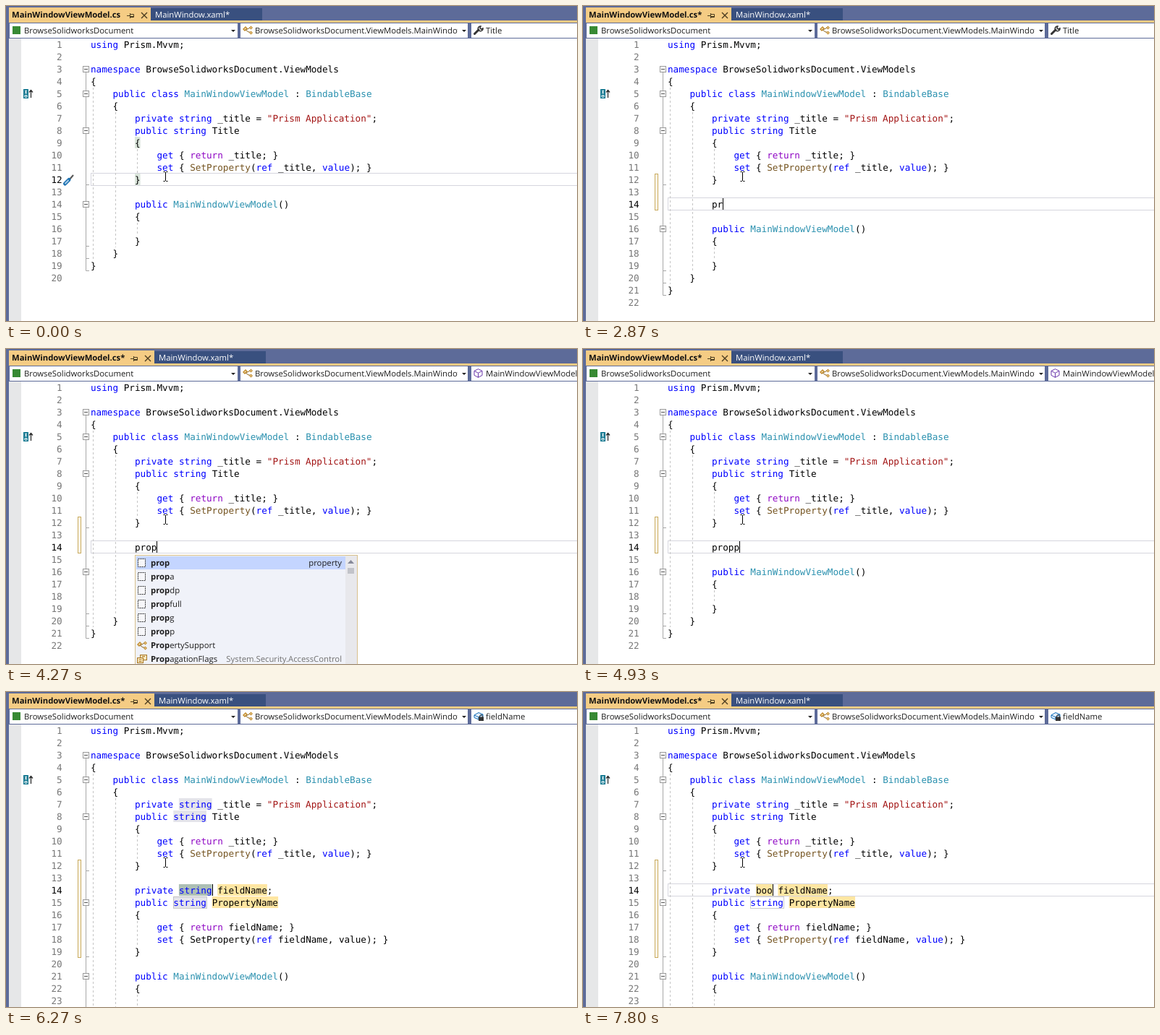
Recreate the animation shown at these times as an HTML page. Size 789 by 436 pixels, loop 8000 ms.

```html
<!DOCTYPE html>
<html lang="en">
<head>
<meta charset="utf-8">
<title>Code editor</title>
<style>
html, body { margin: 0; width: 100%; height: 100%; overflow: hidden; background: #fff; }
svg { display: block; width: 789px; height: 436px; }
svg svg { width: 280px; height: 19px; }
text { text-rendering: geometricPrecision; font: 11.3px "Open Sans", "Noto Sans", sans-serif; }
.code { font: 12.65px "DejaVu Sans Mono", "Noto Sans Mono", monospace; }
.bold { font-weight: bold; }
</style>
</head>
<body>
<svg id="stage" viewBox="0 0 789 436"></svg>
<script>
(() => {
const LOOP = 8000, LEFT = 117, CHAR = 7.62, PITCH = 17;
const YELLOW = '#ffe6a2', MATCH = '#e4e4ea', SELECTED = '#adbfb4', BRACE = '#dbe6dc', GOLD = '#c8a95c', FRAME = '#5d6b99';

const head = [
  'using Prism.Mvvm;', '',
  'namespace BrowseSolidworksDocument.ViewModels', '{',
  '    public class MainWindowViewModel : BindableBase', '    {',
  '        private string _title = "Prism Application";',
  '        public string Title', '        {',
  '            get { return _title; }',
  '            set { SetProperty(ref _title, value); }', '        }'
];
const tail = [
  '        public MainWindowViewModel()', '        {', '', '        }', '    }', '}', ''
];
const typed = word => ['', '        ' + word, ''];
const snippet = type => ['',
  `        private ${type} fieldName;`,
  '        public string PropertyName', '        {',
  '            get { return fieldName; }',
  '            set { SetProperty(ref fieldName, value); }', '        }', ''];

// Each step changes part of the state from its time on.
const steps = [
  [0, { mid: [''], line: 12, caret: 0, brace: 1, tip: 1, bar: 0, nav: 'Title', current: 1 }],
  [330, { caret: 9 }],
  [870, { caret: 0 }],
  [1400, { caret: 9 }],
  [1530, { mid: ['', ''], line: 13, caret: 8, tip: 0, bar: 2 }],
  [1930, { mid: typed(''), line: 14, brace: 0, bar: 3 }],
  [2270, { caret: 0 }],
  [2870, { mid: typed('pr'), caret: 10 }],
  [3470, { mid: typed('pro'), caret: 11, popup: 'pro', pick: 0, nav: 'MainWindowViewModel()' }],
  [4270, { mid: typed('prop'), caret: 12, popup: 'prop' }],
  [4400, { mid: typed('propp'), caret: 13, popup: 'propp', pick: 5 }],
  [4870, { popup: '' }],
  [5000, { mid: snippet('string'), caret: 22, bar: 8, current: 0, plain: 1 }],
  [5070, { type: 6, typeFill: SELECTED }],
  [5130, { field: 1 }],
  [5200, { property: 1, fold: 1 }],
  [5270, { matches: 1, dotted: 1 }],
  [5530, { caret: 0, guide: 1 }],
  [6130, { caret: 22 }],
  [6270, { nav: 'fieldName' }],
  [6930, { mid: snippet('b'), caret: 17, type: 1, typeFill: YELLOW, matches: 0, current: 1 }],
  [7130, { plain: 0 }],
  [7600, { mid: snippet('bo'), caret: 18, type: 2 }],
  [7800, { mid: snippet('boo'), caret: 19, type: 3 }]
];

const rowY = n => 28 + PITCH * n;
const colX = c => LEFT + c * CHAR;
const rect = (x, y, w, h, fill, more = '') => `<rect x="${x}" y="${y}" width="${w}" height="${h}" fill="${fill}" ${more}/>`;
const path = (d, stroke, more = '') => `<path d="${d}" fill="none" stroke="${stroke}" ${more}/>`;
const shape = (d, fill) => `<path d="${d}" fill="${fill}"/>`;
const text = (x, y, s, fill = '#1e1e1e', more = '') => `<text x="${x}" y="${y}" fill="${fill}" ${more}>${s}</text>`;
const mark = (n, col, len, fill) => rect(colX(col), rowY(n), len * CHAR, PITCH - 1, fill);
const at = (x, y, s) => `<g transform="translate(${x} ${y})">${s}</g>`;

function colour(token, plain) {
  if (token[0] === '"') return '#a31515';
  if (token === 'return') return '#8f08c4';
  if (plain && /^(SetProperty|value)$/.test(token)) return '#000';
  if (/^(using|namespace|public|private|class|string|get|set|ref|value)$/.test(token)) return '#0000ff';
  if (/^(MainWindowViewModel|BindableBase)$/.test(token)) return '#2b91af';
  return token === 'SetProperty' ? '#74531f' : '#000';
}

function codeLine(s, n, state) {
  const now = n === state.line;
  let out = text(77.7, rowY(n) + 13, n, now ? '#000' : '#777', 'class="code" text-anchor="end"');
  for (const m of s.matchAll(/"[^"]*"|\w+|[^\s\w"]+/g))
    out += text(colX(m.index), rowY(n) + 13, m[0], colour(m[0], state.plain && n > 12), 'class="code"');
  return out;
}

const classIcon = path('M4 6L8 9M5 6L10 3M8 9H10', '#8a6420') +
  shape('M0 5L4 1L7 4L3 8ZM9 3L11.5 .5L14 3L11.5 5.5ZM9 10L11.5 7.5L14 10L11.5 12.5Z', '#c08a2c') +
  shape('M2 5L4 3L5 4L3 6ZM10.5 3L11.5 2L12.5 3L11.5 4ZM10.5 10L11.5 9L12.5 10L11.5 11Z', '#f8e7bd');
const enumIcon = rect(4.5, .5, 9, 7, '#f8e7bd', 'stroke="#a87520"') + rect(.5, 4.5, 8, 7, '#f8e7bd', 'stroke="#a87520"') +
  path('M7 2.5H11M2.5 7H6.5M2.5 9.5H6.5', '#a87520');
const snippetIcon = rect(.5, .5, 10, 11, '#f7f7fa', 'stroke="#333" stroke-dasharray="2 1"');
const navIcons = {
  Title: path('M1.5 11.5L7 6', '#333', 'stroke-width="3" stroke-linecap="round"') +
    path('M10 1A3.4 3.4 0 1 0 13 4L10.5 5L9 3.5Z', '#333', 'stroke-width="1.6"'),
  'MainWindowViewModel()': path('M6.5 .7L12 3.4V9.4L6.5 12.3L1 9.4V3.4ZM1 3.4L6.5 6.2L12 3.4M6.5 6.2V12.3', '#6936aa'),
  fieldName: '<path d="M1 5L7 1.5L13 4V8L7 11L1 8.5ZM1 5L7 7.5L13 4M7 7.5V11" fill="#dbe9f7" stroke="#1570ba"/>' +
    rect(7, 7.5, 7, 5.5, '#333') + path('M8.7 8V6.3A1.8 1.8 0 0 1 12.3 6.3V8', '#333')
};
const arrow = x => shape(`M${x} 33H${x + 6}L${x + 3} 36Z`, '#222');

function frameBars(s) {
  const d = s.bar ? 5 : 0, edge = 200 + d;
  const combo = (x, w) => rect(x, 24, w, 20, '#fff');
  return rect(0, 0, 789, 45, FRAME) + rect(0, 0, 4, 436, FRAME) +
    rect(4, 45, 17, 391, '#e6e7e8') + rect(4, 2, edge - 4, 20, '#f5cc84') + rect(4, 20, 785, 3, '#f5cc84') +
    rect(edge, 3, 154, 17, '#39507f') +
    text(8, 16, 'MainWindowViewModel.cs' + (d ? '*' : ''), '#111', 'class="bold"') +
    text(206 + d, 16, 'MainWindow.xaml*', '#fff') +
    at(d, 0, path('M167 13.5H171M171.5 10V17M172 11.5H176.5V15.5H172M172 14.5H176', '#4c3d20') +
      path('M187 9L195 17M195 9L187 17', '#4c3d20', 'stroke-width="1.4"')) +
    combo(5, 315) + combo(324, 314) + combo(643, 146) +
    rect(9, 28, 11, 11, '#388a34') + text(25, 38, 'BrowseSolidworksDocument') + arrow(311) +
    at(327, 27, classIcon) +
    `<svg x="344" y="25" width="280" height="19">${text(0, 13, 'BrowseSolidworksDocument.ViewModels.MainWindowViewModel')}</svg>` +
    arrow(630) + at(646, 27, navIcons[s.nav]) + text(663, 38, s.nav);
}

function margin(s, ctor) {
  const last = ctor + 5, tick = n => `M110.5 ${rowY(n) + 15.5}H115`;
  let out = path(`M110.5 ${rowY(3) + 8}V${rowY(last) + 15.5}` + [12, ctor + 3, ctor + 4, last].map(tick).join('') +
    (s.fold ? tick(19) : ''), '#a8a8a8');
  for (const n of [3, 5, 8, ctor].concat(s.fold ? 15 : []))
    out += rect(106.5, rowY(n) + 4.5, 8, 8, '#fff', 'stroke="#999"') + path(`M108 ${rowY(n) + 8.5}H113`, '#555');
  const guide = (x, from, to) => path(`M${x} ${rowY(from)}V${rowY(to + 1)}`, '#c4c4c4', 'stroke-dasharray="3 3"');
  out += guide(120.5, 5, ctor + 4) + guide(151.5, 7, ctor + 3) + guide(181.5, 10, 11) + guide(181.5, ctor + 2, ctor + 2);
  if (s.guide) out += guide(181.5, 17, 18);
  if (s.bar) out += rect(99.5, 232.5, 4, s.bar * PITCH - 1, '#fffdf3', `stroke="${GOLD}"`);
  if (s.tip) out += path('M87 241L93 234', '#555', 'stroke-width="2"') +
    path('M81.5 246L87 240.5', '#1c70b0', 'stroke-width="5" stroke-linecap="round"') +
    path('M81.5 246L86.5 241', '#a8cdea', 'stroke-width="2"');
  return out + rect(24, 115, 7, 13, '#177a92') + path('M26 117.5H29M27.5 117.5V120.5M26 120.5H29M26 123.5H29V126H26Z', '#fff') +
    path('M34.5 127V117M32 119.5L34.5 116.5L37 119.5', '#222', 'stroke-width="1.2"');
}

function marks(s) {
  let out = s.current ? rect(117.5, rowY(s.line) - .5, 680, PITCH, 'none', 'stroke="#d6d6de"') : '';
  if (s.brace) out += mark(9, 8, 1, BRACE) + mark(12, 8, 1, BRACE);
  if (s.matches) out += mark(7, 16, 6, MATCH) + mark(8, 15, 6, MATCH) + mark(15, 15, 6, MATCH);
  if (s.dotted) out += rect(231.5, 283.5, 46, 16, 'none', 'stroke="#999" stroke-dasharray="1 1"');
  if (s.type) out += mark(14, 16, s.type, s.typeFill);
  if (s.field) out += mark(14, 17 + s.type, 9, YELLOW);
  if (s.property) out += mark(15, 22, 12, YELLOW);
  return out;
}

function popup(s) {
  const names = ['prop', 'propa', 'propdp', 'propfull', 'propg', 'propp', 'PropertySupport', 'PropagationFlags'];
  let out = rect(178.5, 285.5, 307, 160, '#f0f2f9', 'stroke="#d8c08c"') +
    rect(180, 287 + s.pick * 19, 289, 18, '#c4d5ff') + rect(469, 286, 16, 150, '#e8e8ec') +
    shape('M472 297H481L476.5 292Z', '#868999') + rect(472, 303, 9, 8, '#c2c3c9');
  names.forEach((name, i) => {
    const y = 296 + i * 19;
    let n = 0;
    while (n < s.popup.length && name[n] && name[n].toLowerCase() === s.popup[n]) n++;
    out += i < 6 ? at(182, y - 6, snippetIcon) : at(181, y - 6, i === 6 ? classIcon : enumIcon);
    out += text(200, y + 4, `<tspan class="bold">${name.slice(0, n)}</tspan>${name.slice(n)}`);
  });
  if (!s.pick) out += text(464, 300, 'property', '#1e1e1e', 'text-anchor="end"');
  return out + text(464, 433, 'System.Security.AccessControl', '#717171', 'text-anchor="end"');
}

function scene(s) {
  const ctor = 13 + s.mid.length;
  const lines = [...head, ...s.mid, ...tail];
  let out = rect(0, 0, 789, 436, '#fff') + marks(s) + margin(s, ctor) + lines.map((l, i) => codeLine(l, i + 1, s)).join('');
  if (s.caret) out += rect(Math.round(colX(s.caret)), rowY(s.line), 1, 16, '#000');
  out += path('M217.5 229.5H219.5L220.5 230.5L221.5 229.5H223.5M220.5 230V242M217.5 242.5H219.5L220.5 241.5L221.5 242.5H223.5', '#000');
  return out + (s.popup ? popup(s) : '') + frameBars(s);
}

const stage = document.getElementById('stage');
let shown = 0;
function tick() {
  const t = performance.now() % LOOP;
  const past = steps.filter(step => step[0] <= t);
  if (past.length !== shown) {
    shown = past.length;
    stage.innerHTML = scene(Object.assign({}, ...past.map(step => step[1])));
  }
  requestAnimationFrame(tick);
}
tick();
})();
</script>
</body>
</html>
```
